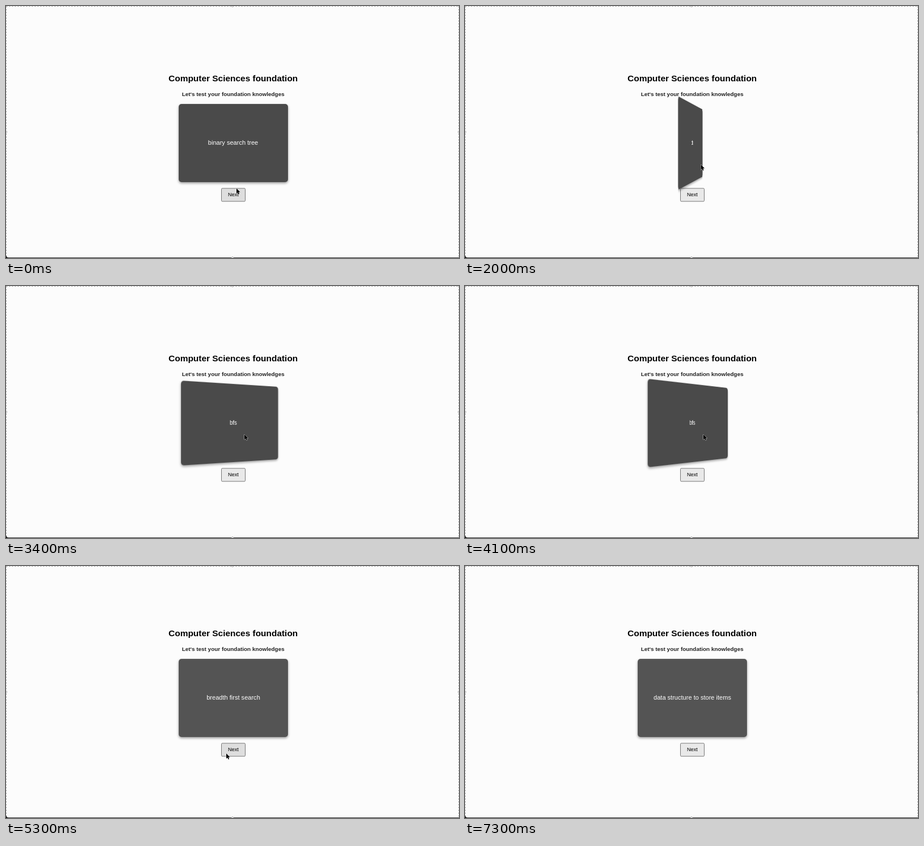
These frames come from a looping animation (800x445 px, 7.8 s). An HTML page:

```html
<!DOCTYPE html>
<html lang="en">
<head>
<meta charset="utf-8">
<title>Flash cards</title>
<style>
  html, body { margin: 0; width: 100%; height: 100%; overflow: hidden; background: #fcfcfc; }
  body { font-family: "Liberation Sans", Arial, sans-serif; }
  #stage { position: relative; width: 800px; height: 445px; overflow: hidden; background: #fcfcfc; }
  #stage svg { position: absolute; left: 0; top: 0; }
  #page { position: absolute; inset: 0; }
  #page text { text-anchor: middle; }
  .title { font: bold 15.45px "Liberation Sans", Arial, sans-serif; }
  .sub { font: bold 9.93px "Liberation Sans", Arial, sans-serif; fill: #222; }
  .label { font: 9.2px "Liberation Sans", Arial, sans-serif; }
  #scene { position: absolute; left: 304.5px; top: 173px; width: 193px; height: 138px; perspective: 575px; }
  #card { width: 100%; height: 100%; transform-style: preserve-3d; }
  .face {
    position: absolute; inset: 0; border-radius: 5px; backface-visibility: hidden;
    color: #fff; font-size: 11.05px; line-height: 137px; text-align: center; white-space: nowrap;
    box-shadow: 0 2px 4px rgba(0, 0, 0, .4);
  }
  #front { background: #4a4a4a; }
  #back { background: #545454; transform: rotateY(180deg); }
</style>
</head>
<body>
<div id="stage">
  <div id="page">
    <svg width="800" height="445">
      <text class="title" x="401.2" y="133">Computer Sciences foundation</text>
      <text class="sub" x="401.2" y="159">Let's test your foundation knowledges</text>
      <rect id="button" x="380.5" y="322" width="42" height="23" rx="1.5" stroke="#767676"/>
      <text class="label" x="401.4" y="336.4">Next</text>
    </svg>
    <div id="scene">
      <div id="card">
        <div class="face" id="front"></div>
        <div class="face" id="back"></div>
      </div>
    </div>
  </div>
  <svg width="800" height="445">
    <path d="M0 .5H800M.5 0V445M799.5 0V445" fill="none" stroke="#aaa" stroke-dasharray="3 2"/>
    <path d="M2 444.5H800" stroke="#333"/>
    <path d="M0 440Q1 444 5 445H0Z" fill="#111"/>
    <g fill="#ddd" stroke="#999" stroke-width=".6">
      <circle cx="400" cy="0" r="1.8"/><circle cx="400" cy="444.5" r="1.8"/>
      <circle cx="0" cy="222.5" r="1.8"/><circle cx="800" cy="222.5" r="1.8"/>
    </g>
    <path id="cursor" d="M0 0V9.2L2.1 7.3L3.6 10.6L5.2 9.9L3.8 6.7H6.6Z" fill="#000" stroke="#fff" stroke-width=".8" paint-order="stroke"/>
  </svg>
</div>
<script>
  const LOOP = 7800, STEP = 100;
  const $ = id => document.getElementById(id);

  // time, front, back
  const cards = [
    [0, "binary search tree", ""],
    [200, "dfs", "depth first search"],
    [2300, "bfs", "breadth first search"],
    [5600, "array", "data structure to store items"]
  ];

  // start, target angle, duration
  const flips = [
    [875, 180, 600], [1802, 0, 600], [2500, 180, 600], [2780, 0, 480], [3319, 180, 600],
    [3827, 0, 600], [4250, 180, 600], [5600, 0, 1], [5960, 180, 600]
  ];

  // time, x, y
  const moves = [
    [0, 407, 322], [300, 406, 328], [800, 417, 267], [1800, 417, 267], [2000, 416.5, 280],
    [2200, 405, 328], [2400, 405, 328], [2500, 421, 262], [4400, 421, 262], [4750, 561, 290],
    [4950, 561, 290], [5200, 389, 331], [5700, 389, 331], [5900, 418, 258], [6550, 418, 258],
    [7200, 212, 49]
  ];

  const cubic = (a, b, s) => 3 * a * s * (1 - s) ** 2 + 3 * b * s * s * (1 - s) + s ** 3;

  // CSS "ease", solved by bisection
  function ease(x) {
    if (x >= 1) return 1;
    let lo = 0, hi = 1;
    for (let i = 0; i < 24; i++) {
      const mid = (lo + hi) / 2;
      if (cubic(.25, .25, mid) < x) lo = mid; else hi = mid;
    }
    return cubic(.1, 1, lo);
  }

  // Each flip starts from wherever the previous one had got to
  function angleAt(t) {
    let angle = 0;
    flips.forEach(([start, target, dur], i) => {
      if (t < start) return;
      const end = Math.min(t, i + 1 < flips.length ? flips[i + 1][0] : LOOP);
      angle += (target - angle) * ease((end - start) / dur);
    });
    return angle;
  }

  function cursorAt(t) {
    const i = moves.findIndex(m => m[0] > t);
    if (i < 0) return moves[moves.length - 1].slice(1);
    const [t0, x0, y0] = moves[i - 1], [t1, x1, y1] = moves[i];
    const k = (t - t0) / (t1 - t0), s = k * k * (3 - 2 * k);
    return [x0 + (x1 - x0) * s, y0 + (y1 - y0) * s];
  }

  function draw(t) {
    const shift = t < 4900 ? 0 : t < 5000 ? 3 : 9;
    const [x, y] = cursorAt(t);
    const [, front, back] = cards.filter(c => c[0] <= t).pop();
    const over = x > 380 && x < 423 && y + shift > 321 && y + shift < 346;

    $("page").style.top = -shift + "px";
    $("front").textContent = front;
    $("back").textContent = back;
    $("card").style.transform = `rotateY(${angleAt(t)}deg)`;
    $("button").setAttribute("fill", over ? "#dedede" : "#e9e9e9");
    $("cursor").setAttribute("transform", `translate(${x} ${y})`);
    $("cursor").style.display = t < 7300 ? "" : "none";
  }

  const begin = performance.now();
  let last = -1;
  function tick() {
    const t = Math.floor((performance.now() - begin) % LOOP / STEP) * STEP;
    if (t !== last) draw(last = t);
    requestAnimationFrame(tick);
  }
  tick();
</script>
</body>
</html>
```
